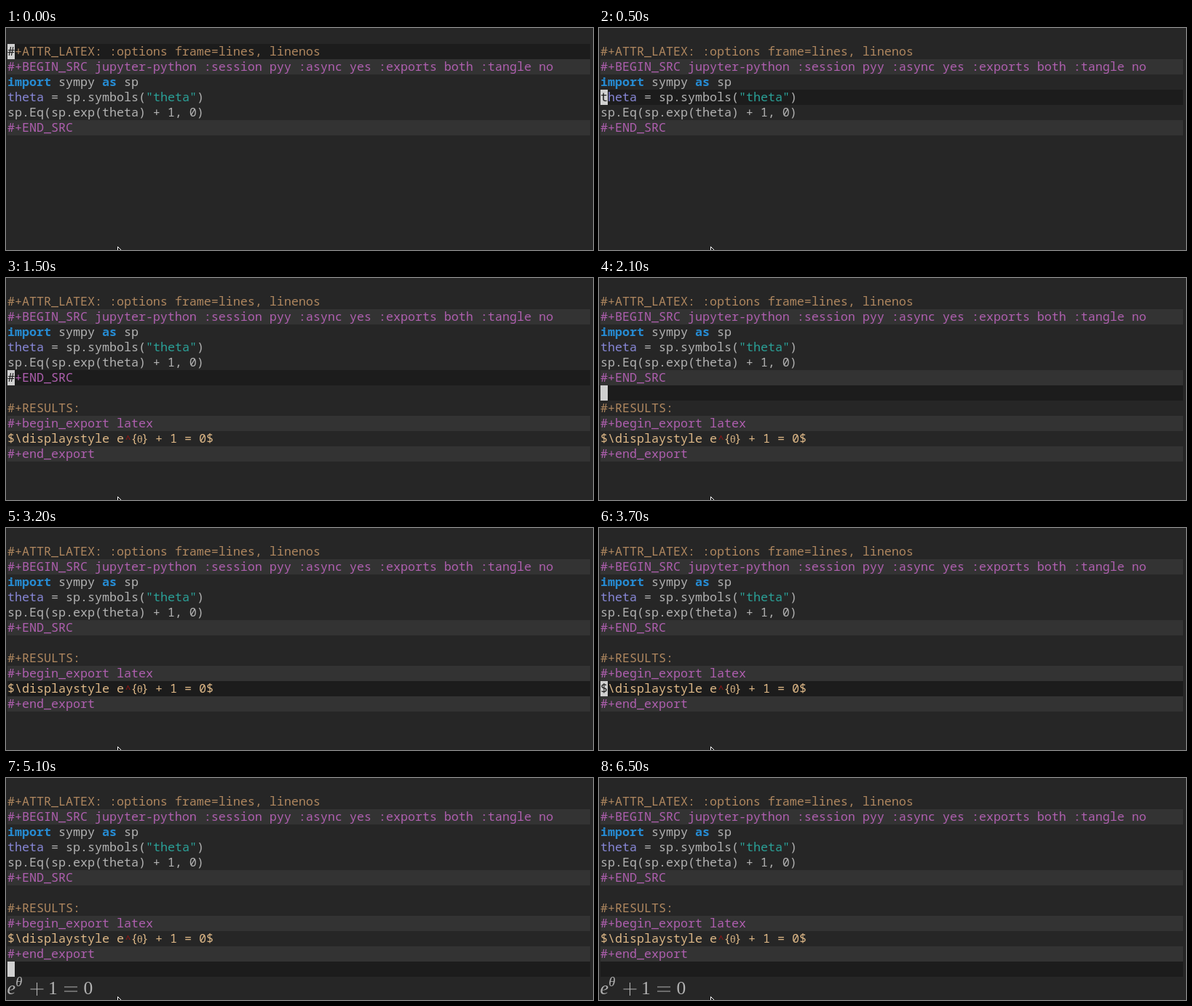
An HTML page for the animation above (6600 ms loop, 806 by 306 pixels).

```html
<!DOCTYPE html>
<html lang="en">
<head>
<meta charset="utf-8">
<title>Org notebook</title>
<style>
  html, body { margin: 0; width: 100%; height: 100%; overflow: hidden; background: #262626; }
  svg { display: block; width: 806px; height: 306px; }
  text { white-space: pre; font: 16.667px "Noto Sans Mono", "DejaVu Sans Mono", monospace; }
  .math text { font-family: "Liberation Serif", serif; fill: #b2b2b2; }
</style>
</head>
<body>
<svg id="stage" viewBox="0 0 806 306"></svg>
<script>
const LOOP = 6600, TOP = 22, ROW = 21, LEFT = 2, WIDTH = 800, CELL = 10, BASELINE = 16;
const C = {
  base: '#b2b2b2', meta: '#af875f', block: '#af5faf', key: '#268bd2',
  name: '#8787d7', str: '#2aa198', math: '#deb887', script: '#a01212',
  band: '#333333', line: '#1c1c1c', flash: '#444444', caret: '#d0d0d0'
};
const stage = document.getElementById('stage');

function add(parent, tag, attrs, content) {
  const node = document.createElementNS('http://www.w3.org/2000/svg', tag);
  for (const k in attrs) node.setAttribute(k, attrs[k]);
  if (content) node.textContent = content;
  parent.appendChild(node);
  return node;
}
const rowY = r => TOP + r * ROW;
const group = () => add(stage, 'g', {});
const bar = (parent, r, fill, width = WIDTH) =>
  add(parent, 'rect', { x: LEFT, y: rowY(r), width, height: ROW, fill });
const show = (node, on) => node.setAttribute('visibility', on ? 'visible' : 'hidden');

function write(parent, r, x, content, fill, style = '', lift = 0) {
  return add(parent, 'text', { x, y: rowY(r) + BASELINE - lift, fill, style }, content);
}
// Lays out [text, colour, style] runs on the character grid.
function runs(parent, r, parts, x = LEFT) {
  for (const [content, fill, style] of parts) {
    write(parent, r, x, content, fill, style);
    x += content.length * CELL;
  }
}

const bandsTop = group(), bandsOut = group();
const lineBar = bar(stage, 0, C.line);
const code = group(), output = group(), pasted = group(), math = group();
math.setAttribute('class', 'math');

[1, 5].forEach(r => bar(bandsTop, r, C.band));
[8, 10].forEach(r => bar(bandsOut, r, C.band));

const bold = 'font-weight:700';
runs(code, 0, [['#+ATTR_LATEX: :options frame=lines, linenos', C.meta]]);
runs(code, 1, [['#+BEGIN_SRC jupyter-python :session pyy :async yes :exports both :tangle no', C.block]]);
runs(code, 2, [['import', C.key, bold], [' sympy ', C.base], ['as', C.key, bold], [' sp', C.base]]);
runs(code, 3, [['theta', C.name], [' = sp.symbols(', C.base], ['"theta"', C.str], [')', C.base]]);
runs(code, 4, [['sp.Eq(sp.exp(theta) + 1, 0)', C.base]]);
runs(code, 5, [['#+END_SRC', C.block]]);

const brace = 'font-size:16px';
const greek = 'font:13px "Noto Serif", serif';
runs(output, 7, [['#+RESULTS:', C.meta]]);
runs(output, 8, [['#+begin_export latex', C.block]]);
runs(output, 9, [['$\\displaystyle e', C.math]]);
write(output, 9, 164, '^', C.script, 'font-size:12px', 1);
write(output, 9, 171.5, '{', C.math, brace);
write(output, 9, 180, 'θ', C.math, greek);
write(output, 9, 186, '}', C.math, brace);
runs(output, 9, [[' + 1 = 0$', C.math]], 195);
runs(output, 10, [['#+end_export', C.block]]);

runs(pasted, 12, [['$\\displaystyle e', C.base]]);
write(pasted, 12, 161.5, 'θ', C.base, 'font:11px "Noto Serif", serif', 5);
runs(pasted, 12, [[' + 1 = 0$', C.base]], 167);

// Rendered formula
const glyph = (x, y, size, content, slant = 'normal') =>
  add(math, 'text', { x, y, style: `font-size:${size}px;font-style:${slant}` }, content);
glyph(1.5, 298, 26, 'e', 'italic');
glyph(13.3, 287, 18.5, 'θ', 'italic');
glyph(58, 298, 25.5, '1');
glyph(106.5, 298, 25.5, '0');
add(math, 'path', {
  d: 'M33.5 291H51.5M42.5 282V300M80 288H98M80 294H98',
  stroke: C.base, 'stroke-width': 1.1, fill: 'none'
});

const caret = group();
const caretBox = bar(caret, 0, C.caret, 10);
const caretChar = write(caret, 0, LEFT, ' ', C.line);

// Mouse pointer
add(stage, 'path', {
  d: 'M153.5 301.5V313L161.5 309.5Z', fill: '#000', stroke: '#fff', 'stroke-linejoin': 'round'
});

const firstChars = '##its# ##$# $';
// [start, row of the caret, caret visible]
const moves = [
  [0, 0, 1], [200, 1, 1], [300, 2, 1], [500, 3, 1], [800, 5, 1],
  [2000, 5, 0], [2100, 6, 1], [2300, 7, 1], [2600, 9, 1], [3200, 9, 0],
  [3500, 9, 1], [4100, 10, 1], [4300, 11, 1], [4500, 12, 1],
  [5000, 11, 1], [5500, 11, 0], [6000, 11, 1], [6500, 11, 0]
];

function draw(t) {
  const [, row, lit] = moves.filter(m => m[0] <= t).pop();
  const y = rowY(row);
  lineBar.setAttribute('y', y);
  lineBar.setAttribute('fill', t >= 3500 && t < 3700 ? C.flash : C.line);
  caretBox.setAttribute('y', y);
  caretChar.setAttribute('y', y + BASELINE);
  caretChar.textContent = firstChars[row];
  show(caret, lit);
  show(bandsOut, t >= 1500);
  show(output, t >= 1500);
  show(pasted, t >= 4500 && t < 5100);
  show(math, t >= 5100);
}

const start = performance.now();
function tick() {
  draw((performance.now() - start) % LOOP);
  requestAnimationFrame(tick);
}
tick();
</script>
</body>
</html>
```
